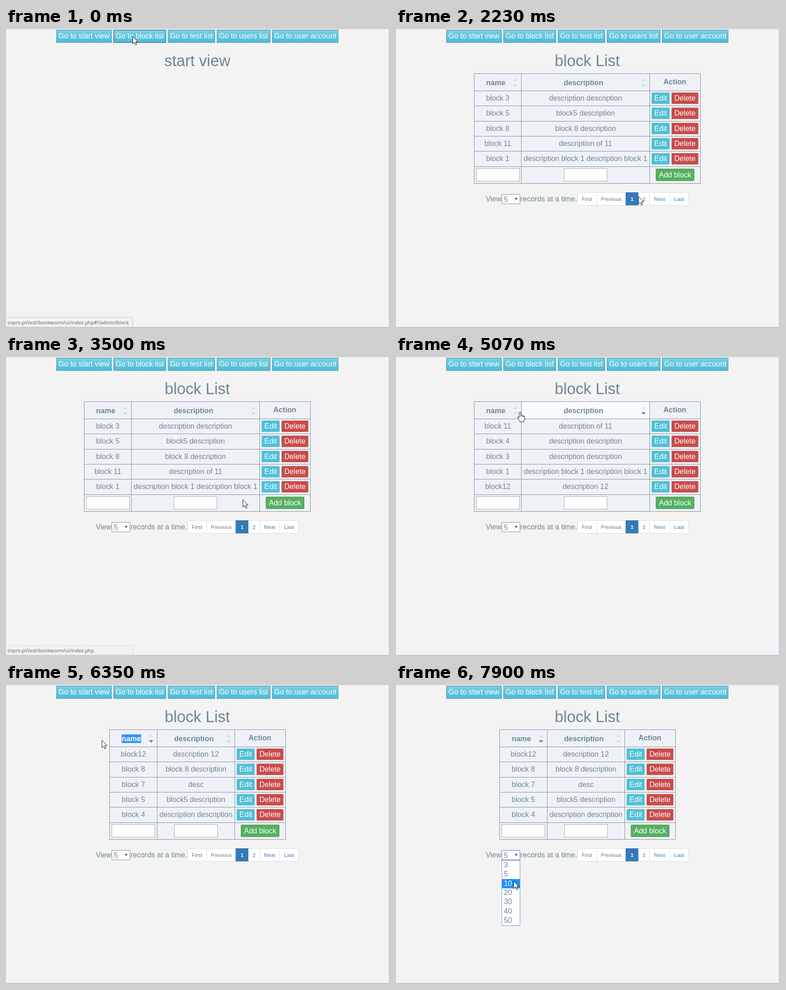
Recreate the animation shown at these times as an HTML page. Size 847 by 661 pixels, loop 8 s.

```html
<!DOCTYPE html>
<html lang="en">
<head>
<meta charset="utf-8">
<title>Block list</title>
<style>
html, body { margin: 0; width: 100%; height: 100%; overflow: hidden; background: #f3f3f3; }
svg { display: block; width: 847px; height: 661px; }
text { font: 16.2px "Liberation Sans", Arial, sans-serif; fill: #6d8796; white-space: pre; }
.mid { text-anchor: middle; }
.bold { font-weight: 700; }
.light { fill: #fff; }
.title { font-size: 34.5px; }
.page { font-size: 11.8px; }
.status { font: 10.85px "Open Sans", "Noto Sans", sans-serif; fill: #5c5c5c; }
.dict { font: 13.2px "Open Sans", "Noto Sans", sans-serif; fill: #f2f2f2; }
.head { font-size: 13.4px; font-weight: 600; }
</style>
</head>
<body>
<svg id="stage" viewBox="0 0 847 661">
  <defs>
    <linearGradient id="nav" x2="0" y2="1">
      <stop stop-color="#78d0e3"/><stop offset="1" stop-color="#4dbbd6"/>
    </linearGradient>
    <linearGradient id="dark" x2="0" y2="1">
      <stop stop-color="#030303"/><stop offset=".15" stop-color="#0c0d0d"/>
      <stop offset=".5" stop-color="#303233"/><stop offset="1" stop-color="#696c6e"/>
    </linearGradient>
  </defs>
  <g id="scene"></g>
</svg>
<script>
const LOOP = 8000;
const scene = document.getElementById('scene');

const run = (a, b, n) => Array.from({ length: n }, (_, i) => Math.round(a + (b - a) * i / (n - 1)));
const ticks = [0, ...run(680, 1670, 8), ...run(1820, 2610, 7), ...run(2890, 3190, 3),
  ...run(3500, 4430, 8), 4550, ...run(5070, 5340, 3), 5610, 6050,
  ...run(6350, 7350, 8), ...run(7620, 7900, 3)];

// pointer path: time, x, y
const path = [
  [820, 279, 18], [2215, 534.5, 371], [2347, 541, 372], [2800, 541, 372],
  [2890, 518, 340], [3040, 500, 298], [3190, 522, 316], [3500, 522, 316],
  [4430, 340, 122], [5000, 340, 122], [5070, 273, 123], [5340, 211, 123.5],
  [6400, 211, 123.5], [7207, 272, 381], [7500, 272, 381], [7900, 259, 434]
];

const LONG = 'description block 1 description block 1';
const blocks = [
  ['block 3', 'description description'], ['block 5', 'block5 description'],
  ['block 8', 'block 8 description'], ['block 11', 'description of 11'],
  ['block 1', LONG], ['block 4', 'description description'],
  ['block 7', 'desc'], ['block12', 'description 12']
];
const navItems = [
  ['Go to start view', 111, 122], ['Go to block list', 237, 116], ['Go to test list', 357, 104],
  ['Go to users list', 465, 118], ['Go to user account', 587, 146]
];
const meaning = ['имя, название, наименование,', 'фамилия, обозначение,',
  'репутация, род, личность, имя', 'существительное, брань,',
  'выдающийся человек, великий', 'человек, пустой звук'];

const between = (t, a, b) => t >= a && t < b;
const text = (s, x, y, cls = '', extra = '') => `<text x="${x}" y="${y}" class="${cls}" ${extra}>${s}</text>`;
const rect = (x, y, w, h, fill, extra = '') =>
  `<rect x="${x}" y="${y}" width="${w}" height="${h}" fill="${fill}" ${extra}/>`;
const line = (x1, y1, x2, y2, color) => `<path d="M${x1} ${y1}L${x2} ${y2}" stroke="${color}"/>`;

function pointer(t) {
  if (t <= path[0][0]) return path[0].slice(1);
  for (let i = 1; i < path.length; i++) {
    const [t1, x1, y1] = path[i];
    if (t > t1) continue;
    const [t0, x0, y0] = path[i - 1];
    const u = (t - t0) / (t1 - t0), e = u * u * (3 - 2 * u);
    return [x0 + (x1 - x0) * e, y0 + (y1 - y0) * e];
  }
  return path[path.length - 1].slice(1);
}

// column 0 or 1, direction 1 (up) or -1 (down)
function sorting(t) {
  if (t < 4550) return [-1, 0];
  if (t < 5070) return [1, 1];
  if (t < 5610) return [1, -1];
  return [0, t < 6050 ? 1 : -1];
}

function tableAt(t) {
  const [col, dir] = sorting(t);
  const second = between(t, 2470, 3500);
  const list = blocks.slice();
  if (col >= 0) list.sort((a, b) => (a[col] > b[col]) - (a[col] < b[col]));
  if (dir < 0) list.reverse();
  const rows = second ? list.slice(5) : list.slice(0, 5);
  const wide = rows.some(r => r[1] === LONG);
  return { col, dir, second, rows, xs: wide ? [172.5, 276.5, 559.5, 671.5] : [228.5, 333.5, 504.5, 616.5] };
}

function hovered(t) {
  if (t < 680) return -1;
  const [x, y] = pointer(t), { xs } = tableAt(t);
  if (y < 100 || y > 138) return -1;
  return between(x, xs[0], xs[1]) ? 0 : between(x, xs[1], xs[2]) ? 1 : -1;
}

function frame(t) {
  const edge = '#8fa9c6';
  return rect(0, 0, 847, 661, '#f3f3f3') + rect(0, 0, 847, 1, '#fafafa') +
    line(0, 1.5, 845, 1.5, '#a3a3aa') + line(845.5, 1, 845.5, 660, edge) +
    rect(846, 0, 1, 661, '#dce8f4') + line(0, 659.5, 846, 659.5, '#9aabc0') +
    rect(0, 660, 847, 1, '#d9e2ec') +
    navItems.map(([s, x, w], i) =>
      rect(x + .5, 4.5, w - 1, 27.5, 'url(#nav)', `stroke="${i === 1 && t < 960 ? '#235670' : '#438ca0'}"`) +
      text(s, x + w / 2, 23, 'mid light')).join('');
}

function arrows(x, state) {
  const tone = on => on ? '#5f7c8c' : '#d2dce1';
  return `<path d="M${x - 5} 116.5h10l-5 -5z" fill="${tone(state > 0)}"/>` +
    `<path d="M${x - 5} 124h10l-5 5z" fill="${tone(state < 0)}"/>`;
}

function table(t, prev) {
  const { col, dir, rows, xs } = tableAt(t);
  const n = rows.length, lit = hovered(prev);
  const mid = xs.slice(1).map((x, i) => (x + xs[i]) / 2);
  const top = i => Math.floor(138.3 + 33.4 * i) + .5;
  const end = top(n) + 37, border = '#8c8c96';
  let s = rect(xs[0], 100.5, xs[3] - xs[0], end - 100.5, '#eef2f7');
  if (lit >= 0) s += rect(xs[lit], 100.5, xs[lit + 1] - xs[lit], 38, '#fafdff');
  for (const x of xs) s += line(x, 100, x, end + .5, border);
  for (const y of [100.5, ...rows.map((_, i) => top(i)), top(n), end]) s += line(xs[0], y, xs[3], y, border);

  const picked = between(t, 6050, 7350);
  if (picked) s += rect(mid[0] - 26, 111, 43, 19, '#3390ff');
  s += text('name', mid[0] - 4.5, 126, 'mid bold' + (picked ? ' light' : '')) +
    text('description', mid[1] - 4.5, 126, 'mid bold') + text('Action', mid[2] - .5, 124, 'mid bold');
  for (const i of [0, 1]) s += arrows(xs[i + 1] - 13.5, col === i ? dir : 0);

  const left = xs[2] + 4.3;
  rows.forEach((r, i) => {
    const y = 142.2 + 33.4 * i, base = y + 17.6;
    s += text(r[0], mid[0], base, 'mid') + text(r[1], mid[1], base, 'mid') +
      rect(left, y, 39.7, 25, '#4fbfd8', 'rx="1.5"') + text('Edit', left + 20, base, 'mid light') +
      rect(left + 44, y, 59, 25, '#c94b49', 'rx="1.5"') + text('Delete', left + 73.5, base, 'mid light');
  });

  const y = top(n) + 4;
  for (const i of [0, 1]) s += rect(Math.floor(mid[i] - 47.5) + .5, y, 95, 28, '#fff', 'stroke="#a6a6ac"');
  s += rect(mid[2] - 42, y + 1, 84, 26, '#55b05f', 'rx="1.5" stroke="#459650"') +
    text('Add block', mid[2], y + 19.5, 'mid light');
  return s + pager(t, rows.length);
}

function pager(t, n) {
  const { second } = tableAt(t), open = t >= 7350;
  const edges = [400.5, 442.5, 507, 534.5, 559.5, 603.5, 645.5];
  const labels = ['First', 'Previous', '1', '2', 'Next', 'Last'];
  const active = second ? 3 : 2, off = second ? [4, 5] : [0, 1];
  let s = text('View', 198, 381.5) + text('records at a time.', 274.5, 381.5) +
    rect(233.5, 366.5, 40, 21, '#fff', `stroke="${open ? '#4f7fcb' : '#8e8e94'}"`) +
    text('5', 238, 382.5) + '<path d="M262 374h6l-3 6z" fill="#5c6a74"/>' +
    rect(400.5, 362.5, 245, 28, '#fff', 'rx="3" stroke="#ddd"');
  for (const x of edges.slice(1, 6)) s += line(x, 362.5, x, 390.5, '#ddd');
  s += rect(edges[active] - .5, 362, edges[active + 1] - edges[active] + .5, 28.8, '#337ab7');
  labels.forEach((l, i) => {
    const fill = i === active ? '#fff' : off.includes(i) ? '#777' : '#337ab7';
    s += text(l, (edges[i] + edges[i + 1]) / 2, 380.5, 'mid page' + (i === active ? ' bold' : ''), `style="fill:${fill}"`);
  });
  return `<g transform="translate(0 ${Math.round(33.4 * (n - 5))})">${s}</g>`;
}

function dropdown(t) {
  const y = pointer(t)[1];
  const pick = y < 388 ? 1 : Math.floor((y - 388.5) / 20.4);
  return rect(233.5, 388.5, 40, 144, '#fff', 'stroke="#6f93cf"') +
    [3, 5, 10, 20, 30, 40, 50].map((v, i) => {
      const top = 389 + 20.4 * i;
      return (i === pick ? rect(234, top, 39.5, 20.4, '#1e90ff') : '') +
        text(v, 238, top + 14.8, i === pick ? 'light' : '');
    }).join('');
}

function popup() {
  return rect(256, 138, 268.5, 210.5, 'url(#dark)', 'rx="4" stroke="#54595c" stroke-width="2"') +
    '<circle cx="277" cy="158.5" r="8.8" fill="#1b1b1b" stroke="#a9a9a9" stroke-width="1.8"/>' +
    '<path d="M274 153.8v9.4l7.5 -4.7z" fill="#c4c4c4"/>' +
    text('имя', 293, 163, 'dict') + text('[nām]', 321, 163, 'dict', 'style="fill:#b4b4b4"') +
    text('имя существительное', 265.5, 188.5, 'dict head') +
    meaning.map((m, i) => text(m, 275, 206 + 17.2 * i, 'dict')).join('') +
    text('глагол', 265.5, 313, 'dict head') +
    text('назвать, называть, указывать,', 275, 330.5, 'dict') +
    rect(505.5, 147.5, 8.5, 125.5, 'none', 'rx="4.2" stroke="#d6d6d6" stroke-width="1.3"');
}

function status(t) {
  const first = t < 960;
  if (!first && !between(t, 2340, 2600) && !between(t, 3500, 3760)) return '';
  return `<path d="M0 637.5H276Q279.5 637.5 279.5 641V659H0" fill="#f2f2f2" stroke="${first ? '#c6c6c6' : '#d6d6d6'}"/>` +
    text('snpro.pl/test/bookworm/ui/index.php' + (first ? '#!/admin/block' : ''), 3, 652.5, 'status');
}

function cursor(t) {
  const [x, y] = pointer(t);
  const hand = hovered(t) >= 0 || between(t, 2340, 2470) || between(t, 3180, 3500);
  const d = hand
    ? 'M-1.8 1.5Q-1.8 0 0 0Q1.8 0 1.8 1.5V7Q4 6 5.2 7.8Q7.2 7 8 8.8Q10.6 8.4 10.6 11V15L8.6 18.5V21.5H-.4V19.5L-4.6 13.5Q-5.6 10.5 -3.4 10.6L-1.8 12.5ZM1.8 7V11M5.2 7.8V11M8 8.8V11.5'
    : 'M0 0V16.5L3.8 12.8L6.4 18.8L9 17.7L6.4 11.8H11.6Z';
  return `<path transform="translate(${x + .5} ${y + .5})" d="${d}" fill="#fff" stroke="#111" stroke-linejoin="round"/>`;
}

function draw(t, prev) {
  const start = t < 680;
  scene.innerHTML = frame(t) +
    text(start ? 'start view' : 'block List', 422, 84, 'mid title') +
    (start ? '' : table(t, prev)) +
    (between(t, 6480, 7350) ? popup() : '') +
    (t >= 7350 ? dropdown(t) : '') + status(t) + cursor(t);
}

let shown = -1;
function tick() {
  const t = performance.now() % LOOP;
  let i = ticks.length - 1;
  while (ticks[i] > t) i--;
  if (i !== shown) {
    shown = i;
    draw(ticks[i], ticks[Math.max(0, i - 1)]);
  }
  requestAnimationFrame(tick);
}
tick();
</script>
</body>
</html>
```
